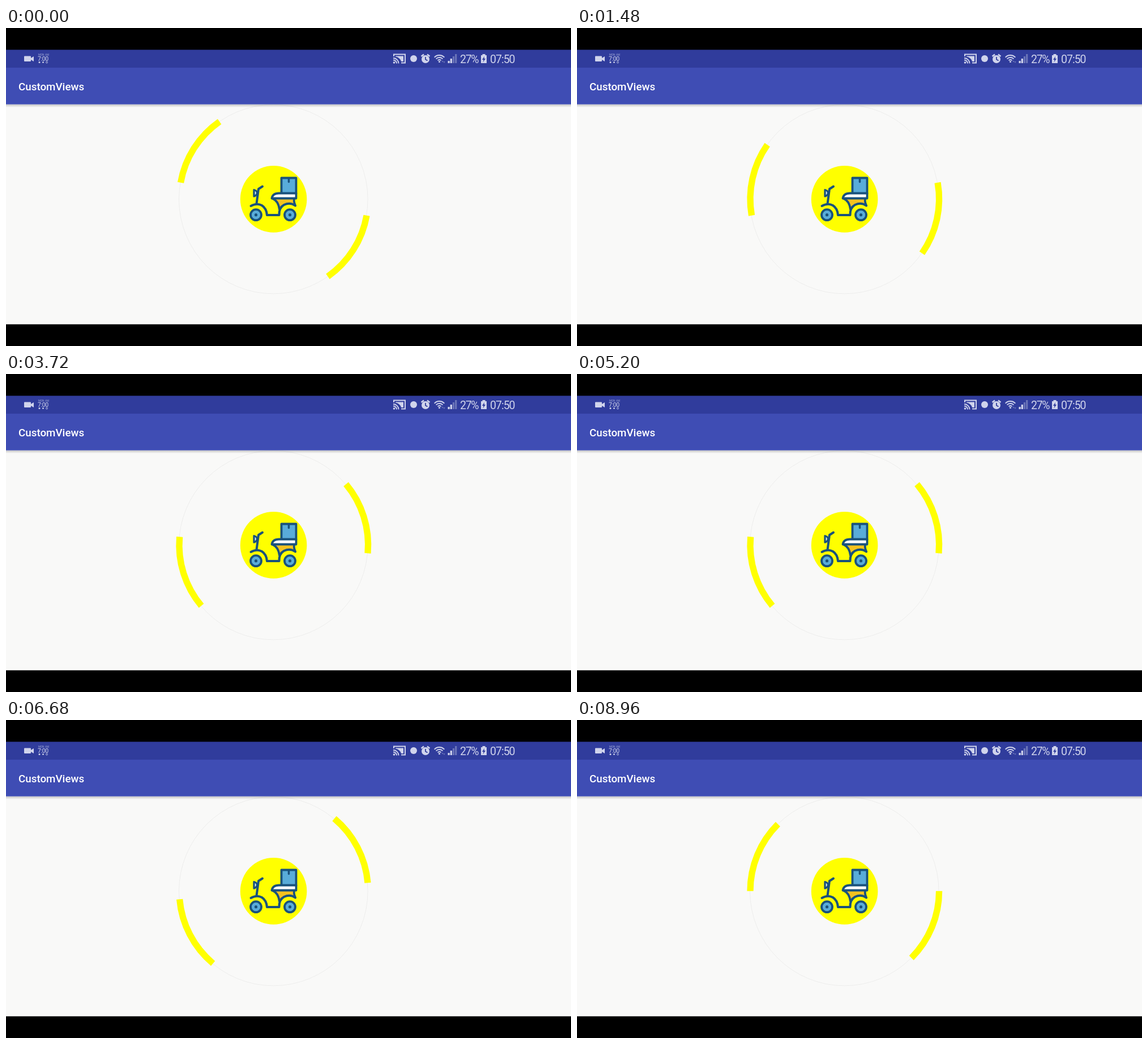
Animation, 998 px wide and 561 px high, one loop 9 s. Source, as an HTML page with a canvas:

```html
<!DOCTYPE html>
<html lang="en">
<head>
<meta charset="utf-8">
<title>Spinner</title>
<style>
html, body { margin: 0; width: 100%; height: 100%; overflow: hidden; background: #000; }
canvas { display: block; width: 998px; height: 561px; }
</style>
</head>
<body>
<canvas id="stage" width="998" height="561"></canvas>
<script>
const stage = document.getElementById('stage');
const still = document.createElement('canvas');
still.width = 998;
still.height = 561;
let g = still.getContext('2d');

const CX = 472.8, CY = 301.7, R = 166.8;
const LOOP = 9000, TICK = 40, STEP = 10;
const NAVY = '#19527c', BLUE = '#59acd9', YELLOW = '#ffff00';
const ICON = '#d0d4ec', DIM = '#6b75b8', STATUS = '#303c9c';
const rad = deg => deg * Math.PI / 180;

function rect(x, y, w, h, color) {
  g.fillStyle = color;
  g.fillRect(x, y, w, h);
}

function disc(x, y, r, color) {
  g.fillStyle = color;
  g.beginPath();
  g.arc(x, y, r, 0, Math.PI * 2);
  g.fill();
}

function arc(x, y, r, from, to, color, width) {
  g.strokeStyle = color;
  g.lineWidth = width;
  g.beginPath();
  g.arc(x, y, r, rad(from), rad(to));
  g.stroke();
}

function path(d, fill, stroke, width) {
  const p = new Path2D(d);
  if (fill) { g.fillStyle = fill; g.fill(p); }
  if (stroke) { g.strokeStyle = stroke; g.lineWidth = width; g.stroke(p); }
}

function text(s, x, y, font, color, spacing = 0) {
  g.font = font + ' Roboto, "Noto Sans", sans-serif';
  g.letterSpacing = spacing + 'px';
  g.fillStyle = color;
  g.fillText(s, x, y);
  g.letterSpacing = '0px';
}

function drawStatusIcons() {
  // camera
  path('M33 49.500H43Q44 49.500 44 50.500V53L49 50V59L44 56V58Q44 59 43 59H33Q32 59 32 58V50.500Q32 49.500 33 49.500Z', ICON);
  // small clock widget
  text('MON', 57, 48.500, '4.500px', '#a4abd6');
  text('AM', 69, 48.500, '4.500px', '#a4abd6');
  text('7:00', 56, 58, '10.500px', ICON, -0.4);
  disc(59, 60.500, 1.500, ICON);
  rect(64, 59.500, 3, 2, ICON);
  arc(72, 60.500, 1.500, 0, 360, ICON, 0.8);
  // screen cast
  path('M685 50V46.500H705V61.500H698', null, ICON, 2);
  disc(685.500, 61, 1.800, ICON);
  arc(684, 62.500, 6, -90, 0, ICON, 1.800);
  arc(684, 62.500, 9.500, -90, 0, ICON, 1.800);
  path('M688 49.500H702V59H698Q696 52 688 50.500Z', ICON);
  disc(720, 54, 6, ICON);
  // alarm
  disc(741, 55, 7, ICON);
  path('M733.500 50L738 46.500M748.500 50L744 46.500', null, ICON, 2.400);
  path('M741 51V55.500L744.500 57.500', null, STATUS, 1.800);
  // wireless
  for (const r of [4, 8, 12]) arc(765.500, 60, r, -137, -43, ICON, 1.800);
  disc(765.500, 59.500, 1.600, ICON);
  path('M771 57L769.500 60H772.500ZM774 62L772.500 59H775.500Z', DIM);
  // signal bars
  for (let i = 0; i < 4; i++) {
    const h = 4 + i * 4;
    rect(780.500 + i * 4.200, 62 - h, 3.200, h, i < 2 ? ICON : DIM);
  }
  text('27%', 802, 61.500, '19.500px', ICON, -1.300);
  // battery
  path('M841.500 46H846.500V48H849V62H839V48H841.500Z', ICON);
  path('M845 50L841 56H843.500L842.500 60.500L847 54H844.500Z', STATUS);
  text('07:50', 855, 61.500, '19.500px', ICON, -1);
}

function drawScooter() {
  disc(CX - 0.2, CY + 0.2, 58.8, YELLOW);
  g.lineCap = g.lineJoin = 'round';
  // box
  path('M486.500 264.500H512.500V292H486.500Z', BLUE, NAVY, 3.800);
  path('M499.500 265V271.500', null, NAVY, 3.500);
  // seat
  path('M472 301H509Q507 307 511 313Q503 308 494 312Q487 315 484 322Q480 307 472 301Z', '#f4c21f');
  path('M469.500 300.500Q471 291.500 482 291.500H512.500V300.500Z', '#ffffff', NAVY, 3.800);
  path('M471 301Q481 305 483 320M509 302Q508 306 511 313', null, NAVY, 3.800);
  // lamp and handlebar
  path('M438 285.500Q443.500 287 443.500 291Q443.500 295 438 297Z', '#d9edf7', NAVY, 3.300);
  path('M453 279.500L446 284L442.500 310', null, NAVY, 4);
  // frame and fenders
  path('M432.500 314Q443 308 452 313Q460 318 461 330H482.500Q482 317 491 312Q502 307 511 313.500', null, NAVY, 4);
  for (const x of [441.500, 501.500]) {
    disc(x, 329.700, 9.500, BLUE);
    arc(x, 329.700, 9.500, 0, 360, NAVY, 3.800);
    disc(x, 329.700, 2.600, NAVY);
  }
  g.lineCap = 'butt';
  g.lineJoin = 'miter';
}

function drawStill() {
  rect(0, 0, 998, 561, '#000');
  rect(0, 38.400, 998, 32, STATUS);
  rect(0, 70, 998, 65, '#3f4db4');
  rect(0, 134.700, 998, 388, '#f9f9f8');
  const shade = g.createLinearGradient(0, 135, 0, 140);
  shade.addColorStop(0, 'rgba(0,0,0,.2)');
  shade.addColorStop(1, 'rgba(0,0,0,0)');
  rect(0, 135, 998, 5, shade);
  text('CustomViews', 22, 110, '500 18.800px', '#fff');
  drawStatusIcons();
  arc(CX - 0.5, CY + 0.3, R, 0, 360, 'rgba(0,0,0,.08)', 0.7);
  drawScooter();
}

// [time, angle]: the spin runs near 600 degrees a second with slight drift
const spin = [[0, 10], [1480, 890], [3720, 2300], [5200, 3200], [6680, 4090], [7560, 4540], [8960, 5400]];

function angleAt(time) {
  const t = Math.min(Math.floor(time / TICK + 1e-6) * TICK, 8960);
  let i = 0;
  while (i < spin.length - 2 && t >= spin[i + 1][0]) i++;
  const [t0, a0] = spin[i], [t1, a1] = spin[i + 1];
  return Math.round((a0 + (a1 - a0) * (t - t0) / (t1 - t0)) / STEP) * STEP;
}

drawStill();
g = stage.getContext('2d');

function draw(now) {
  const a = angleAt(now % LOOP);
  g.drawImage(still, 0, 0);
  g.save();
  g.beginPath();
  g.rect(0, 135, 998, 388);
  g.clip();
  arc(CX, CY, R, a, a + 45, YELLOW, 11.300);
  arc(CX, CY, R, a + 180, a + 225, YELLOW, 11.300);
  g.restore();
}

let start = null;
function frame(now) {
  if (start === null) start = now;
  draw(now - start);
  requestAnimationFrame(frame);
}
draw(0);
requestAnimationFrame(frame);
</script>
</body>
</html>
```
